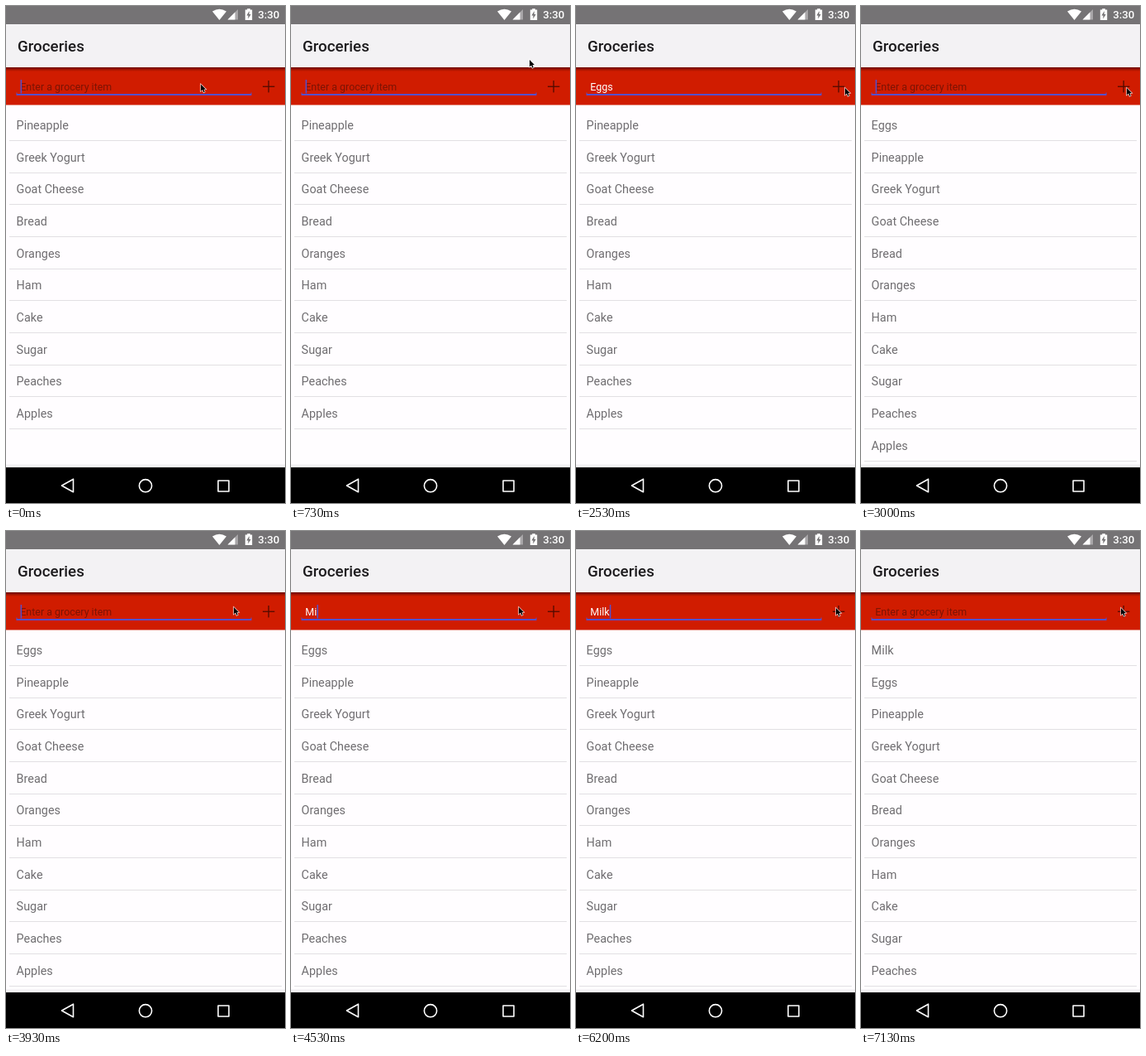
An HTML page with a canvas that plays this animation: 338 px wide and 600 px high, repeating every 7190 ms.

```html
<!DOCTYPE html>
<html lang="en">
<head>
<meta charset="utf-8">
<title>Groceries</title>
<style>
  html, body { margin: 0; width: 100%; height: 100%; overflow: hidden; background: #fffdff; }
  canvas { display: block; width: 338px; height: 600px; }
</style>
</head>
<body>
<canvas id="stage"></canvas>
<script>
const W = 338, H = 600, LOOP = 7190, BLINK = 500, ROW = 38.68;
const RED = '#d01c00', BLUE = '#5550cc';
const canvas = document.getElementById('stage');
const ctx = canvas.getContext('2d');
const ratio = window.devicePixelRatio || 1;
canvas.width = W * ratio;
canvas.height = H * ratio;

const items = ['Milk', 'Eggs', 'Pineapple', 'Greek Yogurt', 'Goat Cheese', 'Bread',
  'Oranges', 'Ham', 'Cake', 'Sugar', 'Peaches', 'Apples'];

// time, field text, number of items added; each edit restarts the caret blink
const edits = [
  [-270, '', 0], [1200, 'E', 0], [1665, 'Eg', 0], [1800, 'Egg', 0], [1930, 'Eggs', 0],
  [2930, '', 1], [4330, 'M', 1], [4500, 'Mi', 1], [4670, 'Mil', 1], [4870, 'Milk', 1],
  [6230, '', 2]
];

// time, x, y of the pointer tip
const path = [
  [0, 236, 94.5], [200, 236, 94.5], [530, 289, 65], [1930, 289, 65], [2330, 326, 99],
  [2730, 326, 99], [3000, 322, 99], [3230, 322, 99], [3470, 276, 92],
  [5270, 276, 92], [5530, 290.5, 93], [6000, 315, 93]
];

function rect(x, y, w, h, color) {
  ctx.fillStyle = color;
  ctx.fillRect(x, y, w, h);
}

function text(str, x, y, size, color, weight = 400) {
  ctx.font = `${weight} ${size}px Roboto, sans-serif`;
  ctx.fillStyle = color;
  ctx.fillText(str, x, y);
}

function poly(points, close = true) {
  ctx.beginPath();
  points.forEach(([x, y]) => ctx.lineTo(x, y));
  if (close) ctx.closePath();
}

function fill(points, color) {
  poly(points);
  ctx.fillStyle = color;
  ctx.fill();
}

function pointerAt(t) {
  const i = path.findIndex(p => p[0] > t);
  if (i < 0) return path[path.length - 1].slice(1);
  const [t0, x0, y0] = path[i - 1], [t1, x1, y1] = path[i];
  const k = (t - t0) / (t1 - t0);
  return [x0 + (x1 - x0) * k, y0 + (y1 - y0) * k];
}

function drawStatus() {
  rect(0, 0, W, 22, '#757375');
  // wifi
  ctx.beginPath();
  ctx.moveTo(258.5, 17);
  ctx.lineTo(250, 6.6);
  ctx.quadraticCurveTo(258.5, 0.8, 267, 6.6);
  ctx.closePath();
  ctx.fillStyle = '#fff';
  ctx.fill();
  // signal
  fill([[268.5, 16.5], [281, 4], [281, 16.5]], '#a9a7a9');
  fill([[268.5, 16.5], [277.5, 7.5], [277.5, 16.5]], '#fff');
  // battery
  rect(292.2, 3.2, 3.6, 2, '#fff');
  rect(289.8, 4.5, 8.4, 12.5, '#fff');
  fill([[294.8, 6], [291.4, 11.6], [293.5, 11.6], [293.2, 15.6], [296.7, 9.9], [294.6, 9.9]], '#757375');
  text('3:30', 305.2, 15.2, 13.2, '#fff', 500);
}

function drawList(added) {
  rect(0, 119, W, 438, '#fffdff');
  items.slice(2 - added).forEach((name, i) => {
    const y = 144 + i * ROW;
    text(name, 12.6, y + 5, 14.4, '#6f6d70');
    rect(4, Math.round(y + 18), 330, 1, '#e2e0e3');
  });
  rect(0, 553, W, 4, '#f6f4f7');
}

function drawField(value, caretOn) {
  rect(0, 74, W, 45.5, RED);
  const shade = ctx.createLinearGradient(0, 74, 0, 79);
  shade.addColorStop(0, 'rgba(40,0,0,.6)');
  shade.addColorStop(1, 'rgba(40,0,0,0)');
  rect(0, 74, W, 5, shade);

  rect(12.5, 106, 285, 2, BLUE);
  rect(12.5, 104.5, 1, 1.5, BLUE);
  rect(296.5, 104.5, 1, 1.5, BLUE);
  text(value || 'Enter a grocery item', 17.3, 102, 12.45, value ? '#fff' : '#7c1404');
  if (caretOn) {
    const x = 17.6 + (value ? ctx.measureText(value).width : 0);
    rect(x, 89, 1.5, 16.5, BLUE);
  }
  rect(311, 96.6, 14.4, 1.3, '#520b00');
  rect(317.5, 90, 1.3, 14.4, '#520b00');
}

function drawNav() {
  rect(0, 557, W, 43, '#000');
  ctx.strokeStyle = '#fff';
  ctx.lineWidth = 1.6;
  ctx.lineJoin = 'round';
  poly([[67.5, 579], [81.5, 571.2], [81.5, 586.8]]);
  ctx.stroke();
  ctx.beginPath();
  ctx.arc(169, 579.2, 7.6, 0, Math.PI * 2);
  ctx.stroke();
  ctx.strokeRect(257, 573, 13, 13);
}

function drawPointer(x, y) {
  const shape = [[0, 0], [0, 8.4], [2, 6.6], [3.4, 9.8], [4.8, 9.2], [3.5, 6.2], [6, 6]];
  poly(shape.map(([dx, dy]) => [x + dx, y + dy]));
  ctx.strokeStyle = 'rgba(255,255,255,.9)';
  ctx.lineWidth = 1.3;
  ctx.lineJoin = 'miter';
  ctx.stroke();
  ctx.fillStyle = '#000';
  ctx.fill();
}

function draw(t) {
  const [start, value, added] = edits.filter(e => e[0] <= t).pop();
  const caretOn = Math.floor((t - start) / BLINK) % 2 === 0;
  ctx.setTransform(ratio, 0, 0, ratio, 0, 0);
  drawList(added);
  drawField(value, caretOn);
  drawStatus();
  rect(0, 22, W, 52, '#f3f2f4');
  text('Groceries', 14, 55.3, 18.8, '#1d1c1e', 500);
  drawNav();
  drawPointer(...pointerAt(t));
}

const begin = performance.now();
function tick() {
  draw((performance.now() - begin) % LOOP);
  requestAnimationFrame(tick);
}
tick();
</script>
</body>
</html>
```
